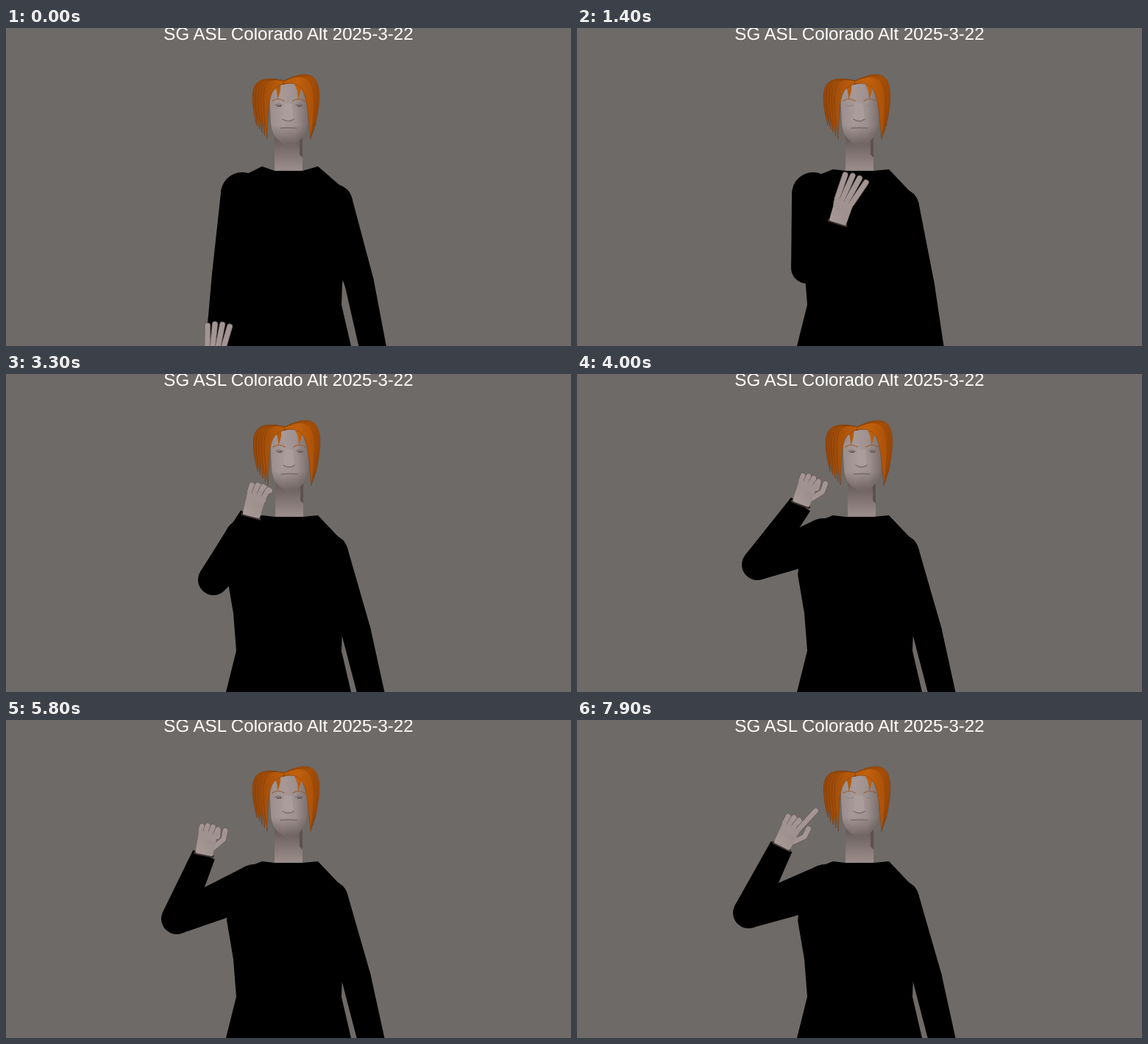
Animation, 768 px wide and 432 px high, one loop 8000 ms. Source, as an HTML page with a canvas:

```html
<!DOCTYPE html>
<html lang="en">
<head>
<meta charset="utf-8">
<title>Signing avatar</title>
<style>
  html, body { margin: 0; width: 100%; height: 100%; overflow: hidden; background: #6e6a67; }
  canvas { display: block; }
  h1 {
    position: absolute; top: -5px; left: 0; width: 768px; margin: 0;
    font: 24.1px/28px "Liberation Sans", Arial, sans-serif;
    color: #fff; text-align: center; white-space: nowrap;
    text-rendering: geometricPrecision;
  }
</style>
</head>
<body>
<canvas width="768" height="432"></canvas>
<h1>SG ASL Colorado Alt 2025-3-22</h1>
<script>
const ctx = document.querySelector('canvas').getContext('2d');
const LOOP = 8000, STEP = 100;

// Signing arm: time, elbow x y, wrist x y, hand angle.
const keys = [
  [0, 301, 335, 284, 470, 0],
  [600, 270, 330, 322, 365, .3],
  [1400, 312, 326, 354, 265, .31],
  [2600, 319, 300, 362, 210, .18],
  [4000, 245, 259, 304, 177, .35],
  [5800, 232, 270, 269, 183, .2],
  [7100, 232, 265, 272, 176, .4],
  [7900, 233, 262, 278, 172, .46]
];

const mix = (a, b, k) => a + (b - a) * k;
const ease = (t, from, to) => {
  const u = Math.min(1, Math.max(0, (t - from) / (to - from)));
  return u * u * (3 - 2 * u);
};
const bump = (t, center, width) => Math.exp(-(((t - center) / width) ** 2));

function armAt(t) {
  const next = Math.max(1, keys.findIndex(key => key[0] >= t));
  const a = keys[next - 1], b = keys[next], k = ease(t, a[0], b[0]);
  return a.map((v, i) => mix(v, b[i], k)).slice(1);
}

function gradient(x0, y0, x1, y1, ...colors) {
  const g = ctx.createLinearGradient(x0, y0, x1, y1);
  colors.forEach((c, i) => g.addColorStop(i / (colors.length - 1), c));
  return g;
}
function fill(d, color) {
  ctx.fillStyle = color;
  ctx.fill(new Path2D(d));
}
function stroke(d, color, width) {
  ctx.strokeStyle = color;
  ctx.lineWidth = width;
  ctx.stroke(new Path2D(d));
}

// Tapered limb through joints [x, y, radius], cut flat at the last one.
function limb(joints) {
  ctx.fillStyle = '#000';
  for (let i = 1; i < joints.length; i++) {
    const [x0, y0, r0] = joints[i - 1], [x1, y1, r1] = joints[i];
    const a = Math.atan2(y1 - y0, x1 - x0) + Math.PI / 2;
    const c = Math.cos(a), s = Math.sin(a);
    ctx.beginPath();
    ctx.arc(x0, y0, r0, 0, 7);
    ctx.fill();
    ctx.beginPath();
    ctx.moveTo(x0 + c * r0, y0 + s * r0);
    ctx.lineTo(x1 + c * r1, y1 + s * r1);
    ctx.lineTo(x1 - c * r1, y1 - s * r1);
    ctx.lineTo(x0 - c * r0, y0 - s * r0);
    ctx.fill();
  }
}

const faceFill = gradient(358, 0, 412, 0, '#9a8d8b', '#a69997', '#9d908e', '#776b69');
const chinShade = gradient(0, 132, 0, 160, '#55494700', '#554947b0');
const neckFill = gradient(0, 152, 0, 190, '#6a5e5c', '#978a88');
const hairFill = gradient(338, 0, 424, 0, '#96470a', '#b4580a', '#c0600c', '#a64d07');

// One lock from the parting to a tip, bulging out towards x = out.
function lock(tipX, tipY, out, top, thick) {
  const d = `M378 72 C${out} ${top} ${out} 86 ${tipX} ${tipY} ` +
            `C${out + thick} 95 ${out + thick} ${top + 18} 378 76Z`;
  fill(d, hairFill);
  stroke(d, '#6f330680', .8);
}

function drawHead(blink) {
  fill('M365 140 H403 V196 H365Z', neckFill);
  fill('M399 145 H403 V176 L399 172Z', '#5d514f');
  const face = 'M358 92 Q362 72 384 71 Q407 74 410 96 V128 Q409 142 400 152 Q386 164 375 155 Q361 148 360 128Z';
  fill(face, faceFill);
  fill(face, chinShade);
  fill('M378 102 L376 123 Q384 129 391 123 L389 103Z', '#aa9d9b');
  stroke('M376 124 Q384 129 391 124', '#786c6a', 1.4);
  stroke('M373 136 Q384 135 395 136', '#786c6a', 1.3);
  for (const x of [370, 398]) {
    stroke(`M${x - 8} 99 q8 -5 16 0`, '#9a5a28', 1.2);
    stroke(`M${x - 4} 105 q4 ${blink ? 2 : -3} 9 0`, blink ? '#8e8280' : '#6d605c', 1.2);
    if (!blink) fill(`M${x - 2} 105 h6 v2 h-6Z`, '#655b59');
    fill(`M${x - 6} 77 Q${x - 1} 84 ${x - 1} 97 Q${x + 4} 86 ${x + 3} 77Z`, hairFill);
  }
  for (let i = 0; i < 5; i++) {
    lock(341 + 3.5 * i, 133 + 4.5 * i, 330 + 4 * i, 60 + i, 11);
    lock(420 - 1.5 * i, 134 + 4.5 * i, 431 - 2 * i, 44 + 2 * i, -14);
  }
}

function drawBody(t) {
  const lift = 1 - ease(t, 0, 900);
  const swing = bump(t, 1400, 600) - .8 * bump(t, 600, 250);
  const top = 192 - 4 * lift;
  fill(`M348 ${top} L365 194 H403 L424 ${top} L${462 + 6 * lift} ${232 - 6 * lift} L470 270
        L457 348 L456 376 L469 432 H299 L313 376 L309 325 L300 272 L310 207Z`, '#000');
  limb([
    [440 + 6 * lift, 243 - 6 * lift, 25],
    [476 + 4 * lift - 10 * swing, 350 - 5 * lift, 20],
    [500 + 2 * lift - 17 * swing, 450, 18]
  ]);
}

// Four fingers and a thumb on a palm, drawn upwards from the wrist.
function drawHand(t) {
  const fold = ease(t, 2700, 3700), aim = ease(t, 6000, 7000);
  const skin = gradient(-12, 0, 14, -30, '#a89a97', '#978987');
  const finger = (x, y, jx, jy, tx, ty) => {
    const d = `M${x} ${y} L${jx} ${jy} L${tx} ${ty}`;
    stroke(d, '#6b5f5d', 8.2);
    stroke(d, '#a39593', 6.6);
  };
  const thumb = mix(-10, 22, fold);
  finger(thumb * .5, -12, thumb, -26, thumb, mix(-48, -38, fold));
  const palm = 'M-10 -2 L-11 -34 H11 L10 -2Z';
  fill(palm, skin);
  stroke(palm, skin, 4);
  for (let i = 0; i < 4; i++) {
    const side = i - 1.5, x = 7 * side, y = -34 + side * side;
    const curl = i < 3 ? fold * (1 - .3 * aim) : fold - aim;
    const angle = .15 + .09 * side;
    const near = 17 * (1 - .65 * curl), far = near + 17 * (1 - 1.6 * curl);
    const at = (r, shift) => [x + r * Math.sin(angle) + shift, y - r * Math.cos(angle)];
    finger(x, y, ...at(near, 0), ...at(far, 4 * curl));
    stroke(`M${x} ${y} L${x * .8} ${y + 10}`, '#a09290', 6.6);
  }
}

function draw(t) {
  const [elbowX, elbowY, wristX, wristY, angle] = armAt(t);
  const shoulderX = 321 + Math.max(0, 300 - elbowX) / 4;
  const blink = (t >= 1300 && t <= 1500) || t >= 7800;
  ctx.fillStyle = '#6e6a67';
  ctx.fillRect(0, 0, 768, 432);
  ctx.lineCap = ctx.lineJoin = 'round';

  ctx.save();
  ctx.translate(3 * bump(t, 4000, 700) + 1.5 * bump(t, 7100, 500), 0);
  drawHead(blink);
  ctx.restore();

  drawBody(t);
  limb([[shoulderX, 225, 29], [elbowX, elbowY, 21], [wristX, wristY, 16]]);

  ctx.save();
  ctx.translate(wristX, wristY);
  ctx.rotate(angle);
  stroke('M-12 0 H12', '#3b3331', 4);
  drawHand(t);
  ctx.restore();
}

const start = performance.now();
function frame() {
  const t = (performance.now() - start) % LOOP;
  draw(Math.floor(t / STEP) * STEP);
  requestAnimationFrame(frame);
}
frame();
</script>
</body>
</html>
```
